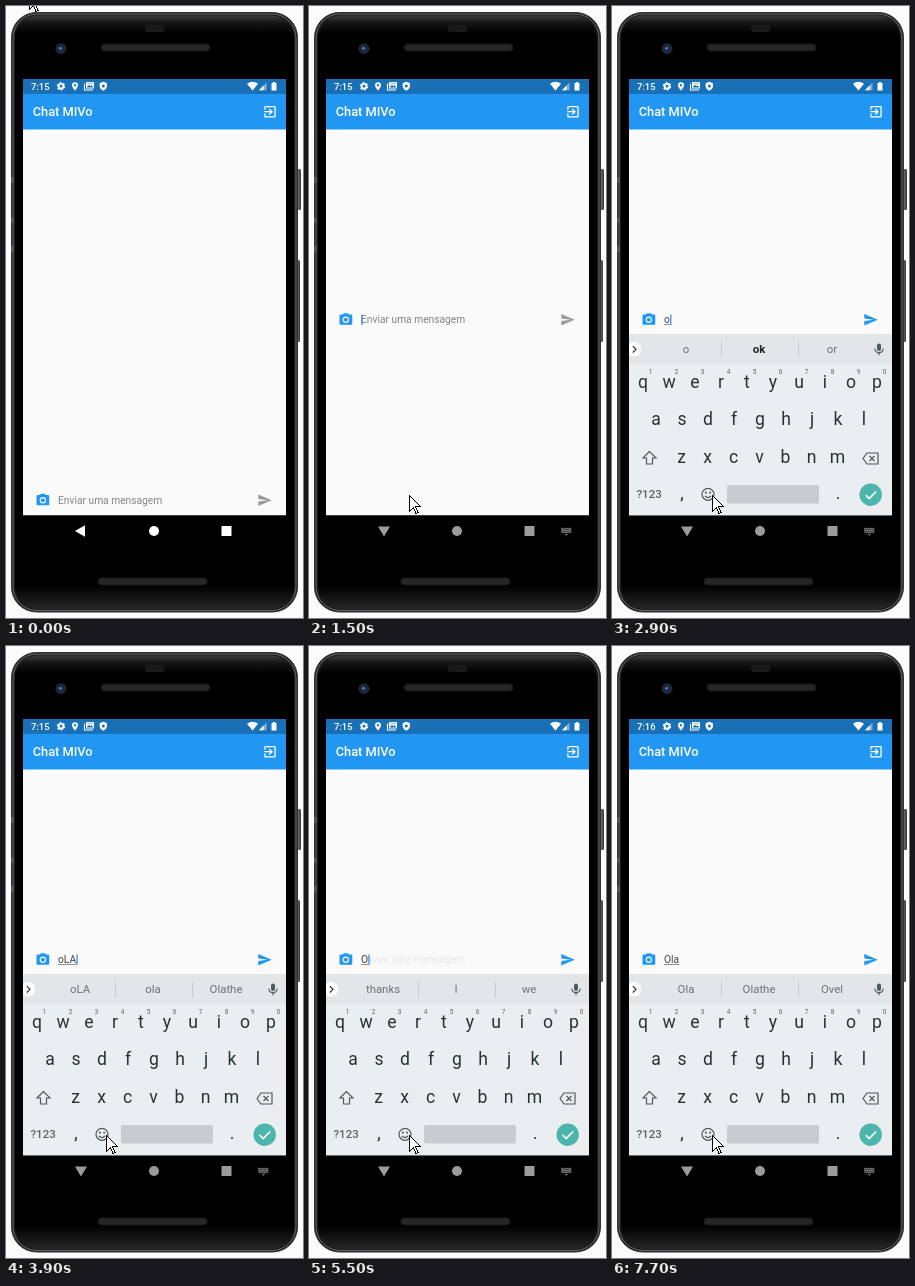
An HTML page for the animation above (8000 ms loop, 297 by 612 pixels).

```html
<!DOCTYPE html>
<html lang="pt">
<head>
<meta charset="utf-8">
<title>Chat</title>
<style>
  html, body { margin: 0; width: 100%; height: 100%; overflow: hidden; background: #fcfcfc; }
  svg { display: block; width: 297px; height: 612px; font-family: Roboto, sans-serif; }
  .input { font-size: 10.24px; }
  .mid { text-anchor: middle; }
  #keys { font-size: 17.6px; fill: #263238; }
  #digits { font-size: 6.4px; fill: #59636a; }
  #tips { font-size: 11.4px; fill: #6a7378; }
  .line { fill: none; stroke: #50595e; stroke-width: 1.2; }
</style>
</head>
<body>
<svg viewBox="0 0 297 612">
  <defs>
    <linearGradient id="face" x2="0" y2="1">
      <stop offset="0" stop-color="#3d3d3d"/><stop offset=".012" stop-color="#161616"/>
      <stop offset=".03" stop-color="#000"/><stop offset=".96" stop-color="#000"/>
      <stop offset="1" stop-color="#262626"/>
    </linearGradient>
    <linearGradient id="button">
      <stop offset="0" stop-color="#222"/><stop offset=".6" stop-color="#666"/>
      <stop offset="1" stop-color="#333"/>
    </linearGradient>
    <clipPath id="screen"><path d="M17 73H280V509.3H17z"/></clipPath>
  </defs>

  <!-- phone body -->
  <g fill="url(#button)">
    <rect x="289" y="163" width="6" height="41" rx="1.5"/>
    <rect x="289" y="254" width="5" height="82" rx="1.5"/>
  </g>
  <rect x="5.5" y="6.5" width="286" height="599.5" rx="25" fill="#1c1c1c" stroke="#333"/>
  <rect x="7" y="8" width="283" height="596.5" rx="24" fill="none" stroke="#686868"/>
  <rect x="9" y="9.5" width="279" height="593.5" rx="22.5" fill="url(#face)"/>
  <path d="M5 171h3v6h-3zM5 212h3v5h-3zM5 240h3v6h-3z" fill="#555"/>
  <rect x="139" y="19" width="19" height="7" rx="2" fill="#191919"/>
  <rect x="95" y="38" width="109" height="7" rx="3.5" fill="#262626" stroke="#171717"/>
  <rect x="92" y="572" width="109" height="7" rx="3.5" fill="#262626" stroke="#171717"/>
  <circle cx="55" cy="42.7" r="5.5" fill="#22252c"/>
  <circle cx="55" cy="42.7" r="3.2" fill="#1a2a50"/>
  <circle cx="54.5" cy="42.3" r="1.3" fill="#6583bd"/>

  <!-- app -->
  <path d="M17 73H280V509.3H17z" fill="#fafafa"/>
  <path d="M17 88H280V123.6H17z" fill="#2196f3"/>
  <path d="M17 73H280V88H17z" fill="#1970b6"/>
  <g fill="#fff">
    <text id="clock" x="25" y="84" font-size="9.4" font-weight="500"></text>
    <circle cx="55" cy="80.3" r="2.4" fill="none" stroke="#fff" stroke-width="1.9"/>
    <circle cx="55" cy="80.3" r="3.7" fill="none" stroke="#fff" stroke-width="1.1" stroke-dasharray="1.9 1.97"/>
    <path fill-rule="evenodd" d="M69 84.6C67 82 66 80.7 66 79.2a3 3 0 0 1 6 0C72 80.7 71 82 69 84.6zM69 78a1.2 1.2 0 1 0 .01 0z"/>
    <path d="M80 76h8v6.5h-8z"/>
    <path d="M78.5 77.5V84h8.5" fill="none" stroke="#fff" stroke-width="1.1"/>
    <path d="M81 81.3l2-2.3 1.4 1.5 1-1.1 1.6 1.9zM81 77.3h6" fill="#1970b6" stroke="#1970b6" stroke-width=".5"/>
    <path d="M97.3 75.8l3.7 1.5v2.5c0 2.3-1.5 4.1-3.7 4.9-2.2-.8-3.7-2.6-3.7-4.9v-2.5z"/>
    <circle cx="97.3" cy="80" r="1.5" fill="#1970b6"/>
    <path d="M246.5 84.5L241 77.7Q246.5 73.7 252 77.7z"/>
    <path d="M253 84.3h7.5v-7.8z" opacity=".45"/><path d="M253 84.3h4.5v-4.7z"/>
    <path d="M265.5 77h1.3v-1h2.4v1h1.3v7.5h-5z"/>
    <text x="26.7" y="110.3" font-size="12.8" font-weight="500">Chat MIVo</text>
    <path transform="translate(256.3 98) scale(.64)" d="M10.09 15.59L11.5 17l5-5-5-5-1.41 1.41L12.67 11H3v2h9.67zM19 3H5c-1.1 0-2 .9-2 2v4h2V5h14v14H5v-4H3v4c0 1.1.9 2 2 2h14c1.1 0 2-.9 2-2V5c0-1.1-.9-2-2-2z"/>
  </g>

  <!-- message row, placed at its raised position -->
  <g id="row">
    <g transform="translate(29.2 306) scale(.64)" fill="#2196f3">
      <circle cx="12" cy="12" r="3.2"/>
      <path d="M9 2L7.17 4H4c-1.1 0-2 .9-2 2v12c0 1.1.9 2 2 2h16c1.1 0 2-.9 2-2V6c0-1.1-.9-2-2-2h-3.17L15 2zm3 15a5 5 0 1 1 0-10 5 5 0 0 1 0 10z"/>
    </g>
    <text id="hint" class="input" x="52" y="317" fill="#858585">Enviar uma mensagem</text>
    <text id="typed" class="input" x="52" y="317" fill="#444"></text>
    <path id="under" fill="#777"/>
    <rect id="caret" y="308.5" width="1.3" height="10.5" fill="#4a86f0"/>
    <path id="send" transform="translate(251 306) scale(.64)" d="M2 21L23 12 2 3v7l15 2-15 2z"/>
  </g>

  <!-- keyboard -->
  <g clip-path="url(#screen)">
    <g id="board">
      <path d="M17 328H280V511H17z" fill="#eaeef1"/>
      <path d="M17 328H280V358H17z" fill="#e2e6e9"/>
      <path d="M109.5 336v15M186.5 336v15" stroke="#c5cacd"/>
      <circle cx="22" cy="343.3" r="7.2" fill="#fff"/>
      <path d="M20.8 340.1l3.2 3.2-3.2 3.2" class="line" style="stroke:#333"/>
      <rect x="265" y="337.5" width="4" height="7.5" rx="2" fill="#50595e"/>
      <path d="M262.8 342.5a4.2 4.2 0 0 0 8.4 0M267 346.7v2.5" class="line"/>
      <g id="tips" class="mid"></g>
      <g id="digits" class="mid"></g>
      <g id="keys" class="mid"></g>
      <path id="shift" d="M37.5 445.5l-6.5 6.5h3.5v6h6v-6h3.5z" class="line"/>
      <path d="M255 447h11v11h-11l-4-5.500zM257.5 450l5 5M262.5 450l-5 5" class="line"/>
      <text x="24.5" y="492.3" font-size="11.5" font-weight="500" fill="#59636a">?123</text>
      <circle cx="96" cy="488.3" r="6" class="line"/>
      <path d="M93 490q3 3.2 6 0" class="line"/>
      <path d="M93 485.8h1.8v1.8H93zM97.3 485.8h1.8v1.8h-1.8z" fill="#50595e"/>
      <rect x="115" y="479" width="92" height="18.5" rx="1.5" fill="#c8cccf"/>
      <circle cx="258.7" cy="488.7" r="11.2" fill="#4db6ac"/>
      <path d="M253.7 489l3.5 3.5 7-7" fill="none" stroke="#fff" stroke-width="1.7"/>
    </g>
  </g>

  <!-- navigation bar -->
  <g id="nav">
    <path id="back"/>
    <circle cx="148" cy="525" r="5"/>
    <path d="M215.5 520h10v10h-10z"/>
    <g id="kbIcon">
      <path d="M252 521.8h10.5v5.4H252z" fill="#444"/>
      <path d="M252.5 522.8h10M253 524.6h9M254 526.4h7" stroke="#888" stroke-dasharray="1.2 .8"/>
      <path d="M255.5 528h3.6l-1.8 1.8z" fill="#777"/>
    </g>
  </g>

  <path id="mouse" d="M.5.5V16.5L4.5 12.5 7 18.5 9 17.5 6.5 11.5H11.5z" fill="#fff" stroke="#000" shape-rendering="crispEdges"/>
</svg>
<script>
const $ = id => document.getElementById(id);
const label = (x, y, s) => `<text x="${x}" y="${y}">${s}</text>`;
const rows = [['qwertyuiop', 31, 381.6], ['asdfghjkl', 44, 419.2], ['zxcvbnm', 69.5, 457]];

const drawKeys = caps => rows.map(([s, x, y]) =>
  [...s].map((c, i) => label(x + i * 26, y, caps ? c.toUpperCase() : c)).join('')).join('') +
  label(70, 493.2, ',') + label(226, 493.2, '.');
const drawTips = tips => tips.split(' ').map((s, i) => label(74 + i * 73, 347.3,
  s === 'ok' ? `<tspan font-weight="700" fill="#222">${s}</tspan>` : s)).join('');

$('digits').innerHTML = [...'1234567890'].map((d, i) => label(38.5 + i * 26, 368.3, d)).join('');

const start = { text: '', hint: 1, caret: 0, up: 0, board: 0, caps: 0, tips: 'thanks I we', clock: '7:15' };

// each step changes only the listed properties
const steps = [
  [1400, { caret: 1 }],
  [1500, { up: 1 }],
  [1600, { board: .6 }],
  [1700, { board: 1, caret: 0 }],
  [2100, { caret: 1 }],
  [2600, { caret: 0 }],
  [2800, { text: 'o', hint: .15, caret: 1 }],
  [2900, { hint: 0, tips: 'o ok or' }],
  [3300, { text: 'oL' }],
  [3400, { tips: 'oL ol of' }],
  [3700, { caps: 1 }],
  [3800, { caps: 0, text: 'oLA' }],
  [3900, { tips: 'oLA ola Olathe' }],
  [4300, { caret: 0 }],
  [4400, { text: 'oL', caret: 1 }],
  [4500, { tips: 'oL ol of' }],
  [4600, { text: 'o' }],
  [4700, { tips: 'o ok or' }],
  [4800, { text: '', hint: .5 }],
  [4900, { hint: 1, tips: 'thanks I we' }],
  [5200, { caret: 0 }],
  [5400, { caps: 1 }],
  [5500, { caps: 0, text: 'O', hint: .15, caret: 1 }],
  [5600, { text: 'Ol', hint: 0 }],
  [5700, { tips: 'Ol Old Ola', clock: '7:16' }],
  [6200, { text: 'Ola' }],
  [6300, { tips: 'Ola Olathe Ovel' }],
  [6800, { caret: 0 }],
  [7300, { caret: 1 }],
  [7700, { caret: 0 }]
];

function render(s) {
  $('clock').textContent = s.clock;
  $('row').setAttribute('transform', `translate(0 ${s.up ? 0 : 180.5})`);
  $('hint').setAttribute('opacity', s.hint);
  $('typed').textContent = s.text;
  const w = s.text ? $('typed').getComputedTextLength() : 0;
  $('under').setAttribute('d', `M52 318.2h${w}v.8h${-w}z`);
  $('caret').setAttribute('x', 52.3 + w);
  $('caret').setAttribute('opacity', s.caret);
  $('send').setAttribute('fill', s.text ? '#2196f3' : '#9a9a9a');
  $('board').setAttribute('opacity', s.board);
  $('board').setAttribute('transform', `translate(0 ${(1 - s.board) * 100})`);
  $('tips').innerHTML = drawTips(s.tips);
  $('keys').innerHTML = drawKeys(s.caps);
  $('shift').style.fill = s.caps ? '#50595e' : 'none';
  $('nav').setAttribute('fill', s.up ? '#9b9b9b' : '#fff');
  $('back').setAttribute('d', s.up ? 'M69 520.5h12l-6 10z' : 'M69 525l10-5.8v11.6z');
  $('kbIcon').setAttribute('opacity', s.up);
}

function moveMouse(t) {
  const k = Math.min(1, Math.max(0, (Math.floor(t / 100) - 1) / 7));
  const e = k * k * (3 - 2 * k);
  const nudge = t < 1100 ? 0 : t < 1200 ? 3 : 6;
  const x = Math.round(23 + 77 * e), y = Math.round(-13 + 496 * e) + nudge;
  $('mouse').setAttribute('transform', `translate(${x} ${y})`);
}

let shown = -1;
function tick(now) {
  const t = now % 8000;
  const n = steps.filter(([at]) => at <= t).length;
  if (n !== shown) {
    render(Object.assign({}, start, ...steps.slice(0, n).map(([, change]) => change)));
    shown = n;
  }
  moveMouse(t);
}

const t0 = performance.now();
function loop() {
  tick(performance.now() - t0);
  requestAnimationFrame(loop);
}
loop();
</script>
</body>
</html>
```
